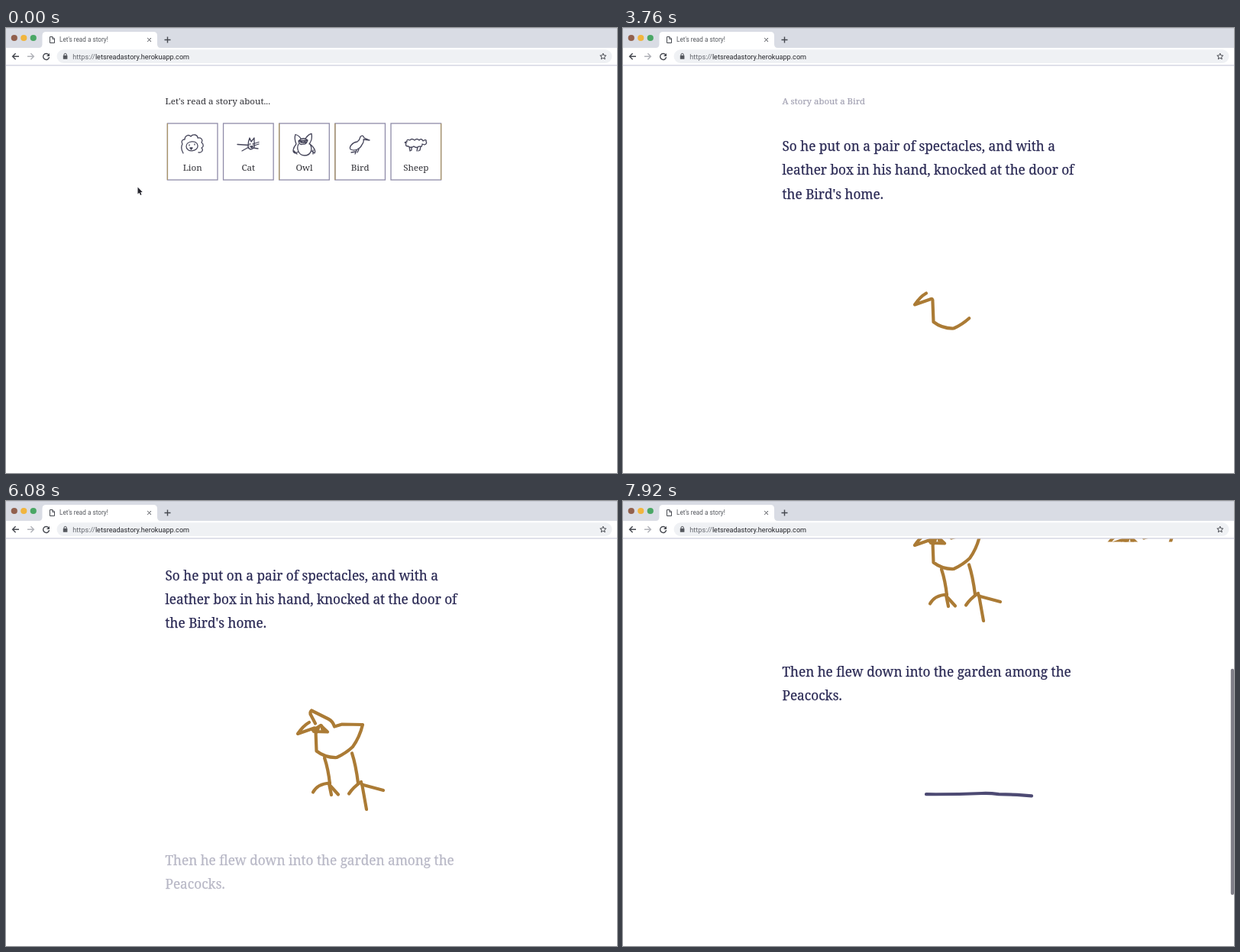
An HTML page for the animation above (8 s loop, 800 by 583 pixels).

```html
<!DOCTYPE html>
<html lang="en">
<head>
<meta charset="utf-8">
<title>Let's read a story!</title>
<style>
  html, body { margin: 0; width: 100%; height: 100%; overflow: hidden; background: #fff; }
  svg { display: block; width: 100%; height: 100%; }
  .ui { font-family: Roboto, Arial, sans-serif; }
  .serif { font-family: "Noto Serif", Georgia, serif; font-size: 11.6px; fill: #303036; }
  .title { font-size: 11.4px; fill: #a3a2b3; stroke: #a3a2b3; stroke-width: .2; }
  .story { font-size: 17.2px; fill: #2b2a55; stroke: #2b2a55; stroke-width: .25; }
  .line { fill: none; stroke-linecap: round; stroke-linejoin: round; }
  .pen { stroke-width: 4.2; }
  .sketch { stroke: #45455a; stroke-width: 1.3; }
  .icon { stroke: #45484f; stroke-width: 1.4; stroke-linecap: butt; stroke-linejoin: miter; }
  .thin { stroke-width: 1; }
</style>
</head>
<body>
<svg viewBox="0 0 800 583">
  <defs>
    <clipPath id="view"><rect y="49" width="800" height="534"/></clipPath>
    <clipPath id="sliver"><rect y="49" width="800" height="4.5"/></clipPath>
  </defs>
  <rect width="800" height="583" fill="#fff"/>

  <g clip-path="url(#view)">
    <g id="menu" class="serif">
      <text x="208.5" y="100">Let's read a story about...</text>
    </g>
    <g id="page" class="serif">
      <g id="intro">
        <text x="208.5" y="100" class="title">A story about a Bird</text>
        <g class="story">
          <text x="208.5" y="161">So he put on a pair of spectacles, and with a</text>
          <text x="208.5" y="192.4">leather box in his hand, knocked at the door of</text>
          <text x="208.5" y="223.8">the Bird's home.</text>
        </g>
      </g>
      <g id="next" class="story">
        <text x="208.5" y="534.3">Then he flew down into the garden among the</text>
        <text x="208.5" y="565.7">Peacocks.</text>
      </g>
      <g id="bird" class="line pen" stroke="#ab7b35"></g>
      <g id="ink" class="line pen" stroke="#4d4a73"></g>
    </g>
    <g id="echo" clip-path="url(#sliver)"><g class="line pen" stroke="#ab7b35"></g></g>
    <rect id="thumb" x="795.8" width="4.2" rx="2" fill="#7f7e88"/>
  </g>

  <g class="ui">
    <rect width="800" height="26" fill="#d9dce4"/>
    <rect width="800" height="1" fill="#c9ccd6"/>
    <circle cx="10.8" cy="13" r="4.1" fill="#91604d"/>
    <circle cx="23.3" cy="13" r="4.1" fill="#f1b53d"/>
    <circle cx="35.8" cy="13" r="4.1" fill="#4aa765"/>
    <path d="M43 26Q47.5 26 47.5 21V10Q47.5 5 52.5 5H193Q198 5 198 10V21Q198 26 202.5 26Z" fill="#fff"/>
    <path class="line icon thin" d="M57.5 11.5H61L63.5 14V19.5H57.5ZM60.8 11.5V14.3H63.5"/>
    <text x="70" y="18.3" font-size="8.2" fill="#55585e">Let's read a story!</text>
    <path class="line icon thin" d="M185.2 13.1L190 17.9M190 13.1L185.2 17.9"/>
    <path class="line icon" d="M207.5 15.5H215.5M211.5 11.5V19.5"/>
    <g id="speaker">
      <path d="M171 14H172.7L175 12V19L172.7 17H171Z" fill="#45484f"/>
      <path class="line icon thin" d="M176.2 13.7Q177.6 15.5 176.2 17.3"/>
    </g>

    <rect y="26" width="800" height="23" fill="#fff"/>
    <rect y="48.3" width="800" height="1.3" fill="#cfd0de"/>
    <rect x="66.5" y="28.3" width="727" height="17.6" rx="8.8" fill="#eff1f4"/>
    <path class="line icon" d="M17 37.3H8.7M12.6 33.3L8.6 37.3L12.6 41.3"/>
    <path class="line icon" style="stroke:#b0b2b8" d="M28 37.3H36.3M32.4 33.3L36.4 37.3L32.4 41.3"/>
    <path class="line icon" d="M55.7 34.9A4 4 0 1 0 56.6 38.2"/>
    <path d="M57 33V37H53Z" fill="#45484f"/>
    <rect x="74.8" y="36" width="5.6" height="4.8" rx=".6" fill="#55585e"/>
    <path class="line icon thin" d="M76 36V35A1.6 1.6 0 0 1 79.2 35V36"/>
    <text x="87.3" y="40.5" font-size="9.15" fill="#25262b"><tspan fill="#666970">https://</tspan>letsreadastory.herokuapp.com</text>
    <path id="star" class="line icon thin"/>
  </g>

  <g id="cursor">
    <path id="arrow" d="M0 0V9L2.1 7.2L3.5 10.5L5 9.8L3.6 6.7L6.2 6.5Z" fill="#24242c" stroke="#fff" stroke-width=".7" paint-order="stroke"/>
    <path id="hand" d="M-1 1Q0 -1 1 1V4.2L5 5.2Q6 5.5 5.8 7L5 10.5H.3L-2.3 6.6Q-2.3 5.2 -1 6.2Z" fill="#fff" stroke="#33333c" stroke-linejoin="round"/>
  </g>
</svg>
<script>
const LOOP = 8000, STEP = 80;
const $ = id => document.getElementById(id);
const add = (parent, tag, attrs, text = '') => {
  const el = document.createElementNS(parent.namespaceURI, tag);
  for (const key in attrs) el.setAttribute(key, attrs[key]);
  el.textContent = text;
  return parent.appendChild(el);
};
const clamp = v => Math.min(1, Math.max(0, v));
const ramp = (t, from, to) => clamp((t - from) / (to - from));
const ease = v => v * v * (3 - 2 * v);
const show = (el, on) => el.setAttribute('visibility', on ? 'visible' : 'hidden');

// Rows of [time, ...values], eased between neighbours.
function track(rows, t) {
  const i = rows.findIndex(row => row[0] > t);
  if (i < 0) return rows[rows.length - 1].slice(1);
  if (i === 0) return rows[0].slice(1);
  const a = rows[i - 1], b = rows[i], k = ease(ramp(t, a[0], b[0]));
  return a.slice(1).map((v, n) => v + (b[n + 1] - v) * k);
}

const animals = [
  ['Lion', 'M232 164Q228 157 231 152C229 148 231 146 234 146C234 141 239 139 242 142C245 138 251 140 251 144C256 143 258 147 256 150C259 152 259 156 256 157C259 160 256 164 252 163M236 155C236 148 250 146 251 154C252 162 236 164 236 155M240 153V154M247 152V153M241 157L244 157L242.5 159Z'],
  ['Cat', 'M317 154L317.5 149L319 144L321 149L325 144L325 152Q327 157 321 159Q316 158 317 154M319 152H320M323 152H324M320 155L323 155L321.5 157ZM303 152.5L318 153.5M309 161L318 156M322 155L331 152M323 152L331 149.5M323 157L330 158'],
  ['Owl', 'M380 152C378 147 378 142 379 139.5Q384 141 386 145M392 145Q396 139 400 138.5C401 143 400 148 397 152M383 148Q389 142 395 147Q393 153 389 152Q384 154 383 148L395 147M385 149H388M390 149H393M386 150L392 150M383 152C380 158 383 167 391 167C399 167 402 159 398 152M380 152C376 157 374 163 379 164L383 162M377 161L381 165M398 152C403 156 406 161 404 164L400 161M402 160V165'],
  ['Bird', 'M476 147L469 144Q467 139 464 142.5Q463 147 460 149C453 150 449 156 451 159C457 162 464 158 466 153Q469 149 468 146L476 147M459 160L457 165M452 163L458 162M462 159L460 163'],
  ['Sheep', 'M525 149Q524 145 529 147Q531 144 535 147Q538 144 541 147Q544 144 546 148Q551 145 550 149Q552 151 548 153L545 152Q545 157 541 155Q537 158 534 155Q530 158 527 155Q522 155 524 151Q520 150 525 149M528 156L529 161L531 160L531 156M539 156L538 161M543 155L542 160L540 161']
];
const CARD = { x: 211.4, y: 125, w: 65.6, h: 74, gap: 73.15 };
const cards = animals.map(([name, icon], i) => {
  const x = CARD.x + i * CARD.gap, right = x + CARD.w, bottom = CARD.y + CARD.h;
  const box = add($('menu'), 'rect', { x, y: CARD.y, width: CARD.w, height: CARD.h, fill: '#fff', stroke: '#8f8ca9', 'stroke-width': 1.3 });
  const tan = i === 4 ? right : [0, 2, 3].includes(i) && x;
  if (tan) add($('menu'), 'path', { d: `M${tan} ${CARD.y}V${bottom}`, stroke: '#a99468', 'stroke-width': 1.3 });
  add($('menu'), 'path', { d: icon, class: 'line sketch' });
  const label = add($('menu'), 'text', { x: x + CARD.w / 2, y: 187, 'text-anchor': 'middle' }, name);
  return { x, right, box, label };
});

const birdStrokes = [
  'M397 347.5Q389 352 382 362.5L402 355.5Q406 353 405.5 359L406.500 385Q418 394 433 393.5Q445 388 454 379.5Q463 367 467 350.5L440 350L430 353Q428 346 422 343L400 332Q397 335 399.5 338.5L405 349',
  'M402 358L412 351.5L421 360L403 359.5',
  'M407 360L409 355M413 352L415 359',
  'M417 394Q422 409 424 428', 'M402 439Q408 428 424 427', 'M423 428L426 442.5', 'M425 431L435 442',
  'M453 388Q458 403 461 427', 'M449 441Q455 432 465 425.5', 'M466 429L494 436.5', 'M466 428L472 461.5'
];
const inkStrokes = ['M397 688.7Q435 689 470 687.5Q480 687 492 688.7L516 689.3L535 690.8'];

// Returns a function revealing the strokes one after another, by fraction of total length.
function pen(group, strokes) {
  let total = 0;
  const parts = strokes.map(d => {
    const el = add(group, 'path', { d }), length = el.getTotalLength(), start = total;
    total += length;
    return { el, length, start };
  });
  return fraction => parts.forEach(({ el, length, start }) => {
    const drawn = Math.min(length, fraction * total - start);
    show(el, drawn > 0);
    el.setAttribute('stroke-dasharray', drawn < length ? `${Math.max(0, drawn)} 9999` : 'none');
  });
}
const drawBird = pen($('bird'), birdStrokes);
const drawInk = pen($('ink'), inkStrokes);
const echoBird = $('echo').firstElementChild;
birdStrokes.forEach(d => add(echoBird, 'path', { d }));

$('star').setAttribute('d', 'M' + Array.from({ length: 10 }, (_, i) => {
  const a = Math.PI * (i / 5 - 0.5), r = i % 2 ? 1.9 : 4.2;
  return `${(781.8 + r * Math.cos(a)).toFixed(2)} ${(37.4 + r * Math.sin(a)).toFixed(2)}`;
}).join('L') + 'Z');

const cursorPath = [
  [40, 172.5, 208.5], [400, 189, 188], [520, 189, 188], [1160, 446.5, 185.5],
  [1880, 446.5, 185.5], [2200, 495.3, 243.3], [2240, 495.3, 243.3], [2560, 752, 271]
];
const scrollPath = [[4440, 0], [4640, 57.5], [6120, 57.5], [6320, 223], [7720, 223], [7900, 304.5]];
const VIEW = 534;

function render(t) {
  const menuAlpha = 1 - ramp(t, 1720, 2080);
  $('menu').setAttribute('opacity', menuAlpha);
  $('intro').setAttribute('opacity', ramp(t, 2880, 3280));
  $('next').setAttribute('opacity', ramp(t, 6000, 6240));

  const [x, y] = track(cursorPath, t);
  const hover = menuAlpha > 0.3 && y > CARD.y && y < CARD.y + CARD.h
    ? cards.findIndex(card => x > card.x && x < card.right) : -1;
  cards.forEach((card, i) => {
    card.box.setAttribute('fill', i === hover ? '#fbfbf0' : '#fff');
    card.label.setAttribute('text-decoration', i === hover ? 'underline' : 'none');
  });
  $('cursor').setAttribute('transform', `translate(${x} ${y})`);
  show($('arrow'), t < 2600 && hover < 0);
  show($('hand'), t < 2600 && hover >= 0);

  drawBird(ramp(t, 3335, 5080));
  drawInk(ramp(t, 7680, 7920));
  show($('speaker'), t >= 4000 && t < 5600);

  const [scroll] = track(scrollPath, t);
  $('page').setAttribute('transform', `translate(0 ${-scroll})`);
  echoBird.setAttribute('transform', `translate(252 ${-scroll})`);
  show($('echo'), t >= 7900);

  const height = t < 6000 ? 621 : 963;
  const alpha = t < 6000 ? 1 - ramp(t, 4880, 5080) : t < 7000 ? 1 - ramp(t, 6400, 6560) : 1;
  const scrolling = t >= 4480 && t < 5120 || t >= 6160 && t < 6560 || t >= 7760;
  $('thumb').setAttribute('y', 51 + scroll * VIEW / height);
  $('thumb').setAttribute('height', VIEW * VIEW / height);
  $('thumb').setAttribute('opacity', scrolling ? alpha : 0);
}

const origin = performance.now();
function tick() {
  const t = (performance.now() - origin) % LOOP;
  render(Math.floor(t / STEP) * STEP);
  requestAnimationFrame(tick);
}
tick();
</script>
</body>
</html>
```
